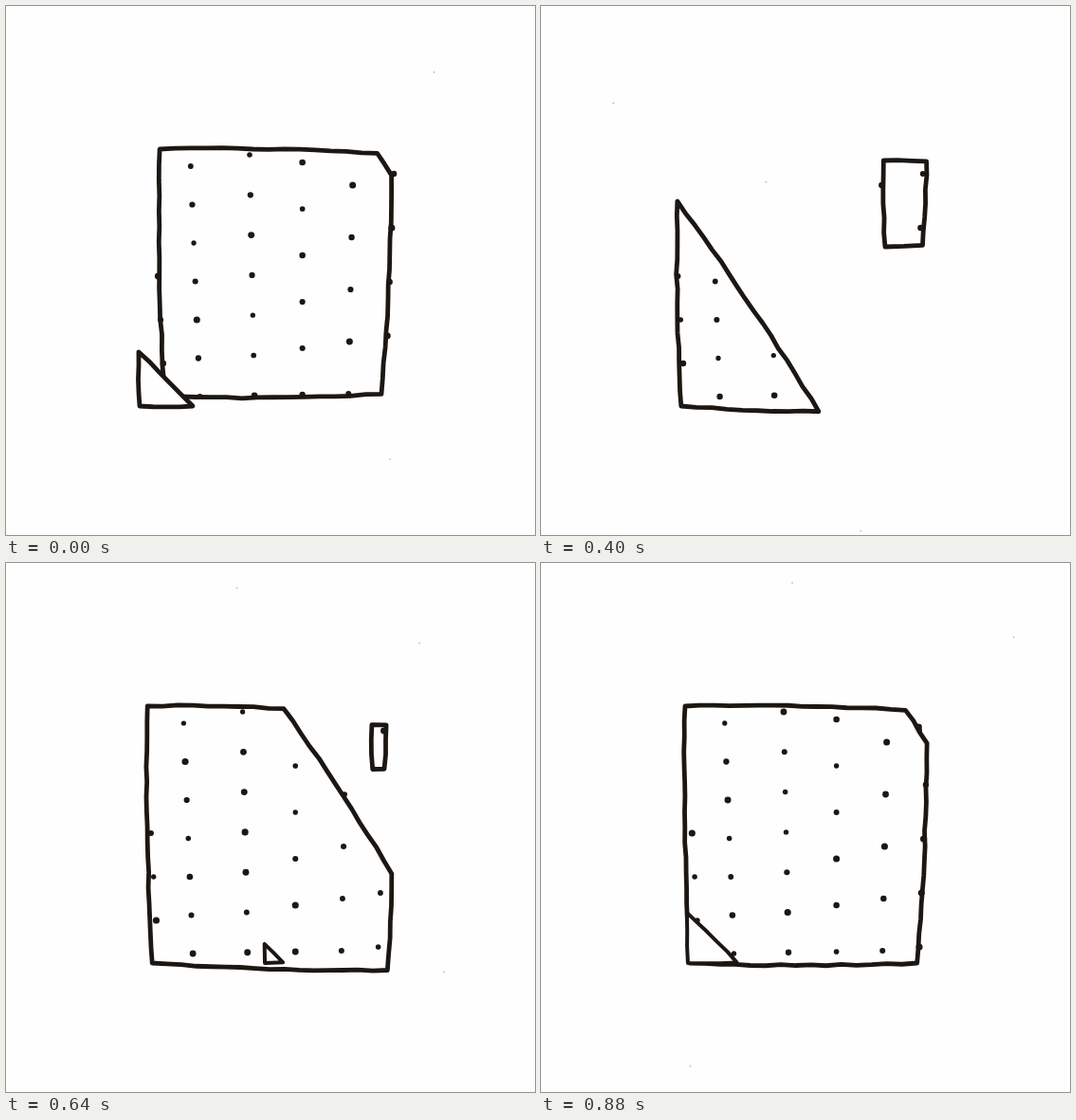
An HTML page with a canvas for the animation above (960 ms loop, 558 by 558 pixels).

```html
<!DOCTYPE html>
<html lang="en">
<head>
<meta charset="utf-8">
<title>Dotted sheet</title>
<style>
  html, body { margin: 0; width: 100%; height: 100%; overflow: hidden; background: #fefefe; }
  canvas { display: block; width: 100%; height: 100%; }
</style>
</head>
<body>
<canvas id="stage" width="558" height="558"></canvas>
<script>
const ctx = document.getElementById('stage').getContext('2d');
const SIZE = 558, INK = '#1c1712', PAPER = '#fefefe';
const STEPS = 12, STEP_MS = 80;
const FIRST_AGE = -5, FLOOR = 422;

const lerp = (a, b, t) => a + (b - a) * t;
const ease = t => (1 - Math.cos(Math.PI * t)) / 2;
const noise = n => { const v = Math.sin(n * 127.1) * 43758.5453; return v - Math.floor(v); };

// Eased value through [age, value] keys, held at both ends
const track = (...keys) => age => {
  const next = keys.findIndex(([at]) => at >= age);
  if (next < 0) return keys[keys.length - 1][1];
  if (next === 0) return keys[0][1];
  const [from, a] = keys[next - 1], [to, b] = keys[next];
  return lerp(a, b, ease((age - from) / (to - from)));
};

// A sheet slides in before age 0, grows until 12, then shrinks away.
const leftAt = track([-5, 287], [0, 141], [11, 157], [12, 167], [13, 197], [15, 301], [17, 363], [19, 385], [23, 397]);
const rightAt = track([7, 403], [12, 396], [14, 406], [20, 399]);
const topAt = track([14, 151], [17, 163], [21, 172]);
const bottomAt = track([11, FLOOR], [12, 412], [13, 379], [15, 289], [17, 254], [23, 181]);
const reachAt = track([-5, 303], [0, 197], [1, 202], [3, 235], [5, 289], [7, 397], [9, 540], [11, 558], [15, 606]);
const dotShiftAt = track([0, -22], [13, 2], [20, -9]);

// Columns of dots: x, first y, spacing
const columns = [[159, 285, 46], [198, 169, 40.5], [258, 157, 42.3], [311, 165, 49], [362, 189, 55], [403, 177, 57]];

// Keeps the part of a polygon where side(point) is positive
function cut(points, side) {
  return points.flatMap((p, i) => {
    const q = points[(i + 1) % points.length];
    const a = side(p), b = side(q), t = a / (a - b);
    const kept = a >= 0 ? [p] : [];
    if (a * b < 0) kept.push([lerp(p[0], q[0], t), lerp(p[1], q[1], t)]);
    return kept;
  });
}

// Tapered sheet, cut by a diagonal that sweeps to the right
function sheetCorners(age) {
  const left = leftAt(age), right = rightAt(age), top = topAt(age), bottom = bottomAt(age);
  const tall = (bottom - top) / 270, wide = (right - left) / 250;
  const drop = 10 * Math.sin(Math.PI * age / 11);
  const slant = 0.65 + 0.35 * Math.exp(-Math.max(age, 0) / 1.8);
  return cut([
    [left - 5 * tall, top],
    [left, bottom],
    [right, bottom + drop * wide],
    [right + 12 * tall, top + 5 * wide]
  ], ([x, y]) => reachAt(age) - (FLOOR - y) * slant - x);
}

// Hand-drawn outline: edges bulge a little and shake
function outline(points, seed) {
  const path = new Path2D();
  points.forEach(([x, y], i) => {
    const [x2, y2] = points[(i + 1) % points.length];
    const dx = x2 - x, dy = y2 - y, length = Math.hypot(dx, dy);
    const parts = Math.max(1, Math.round(length / 16));
    path.lineTo(x, y);
    for (let n = 1; n < parts; n++) {
      const t = n / parts;
      const push = 0.04 * t * (1 - t) + (noise(seed * 31 + i * 17 + n) - 0.5) * 1.4 / length;
      path.lineTo(x + dx * t - dy * push, y + dy * t + dx * push);
    }
  });
  path.closePath();
  return path;
}

function circle(x, y, r) {
  ctx.beginPath();
  ctx.arc(x, y, r, 0, Math.PI * 2);
  ctx.fill();
}

function drawDots(path, age) {
  ctx.lineWidth = 6; // reach of the edge for dots that touch it
  columns.forEach(([x0, first, gap], c) => {
    for (let y = first; y < 414; y += gap) {
      const x = x0 + dotShiftAt(age) + (3 - c) * 0.02 * (y - 290);
      if (ctx.isPointInPath(path, x, y) || ctx.isPointInStroke(path, x, y))
        circle(x, y, 2.6 + noise(age * 7 + c * 13 + y));
    }
  });
}

function drawSheet(age) {
  if (age < FIRST_AGE) return;
  const path = outline(sheetCorners(age), age);
  ctx.fillStyle = PAPER;
  ctx.fill(path);
  ctx.strokeStyle = ctx.fillStyle = INK;
  ctx.lineWidth = age < 0 ? 4 : 4.8;
  ctx.stroke(path);
  if (age > 0) drawDots(path, age);
}

function drawDust(step) {
  ctx.fillStyle = '#aaa';
  for (let n = 0; n < 3; n++) {
    const seed = step * 5 + n + 1;
    circle(noise(seed) * SIZE, noise(seed + 0.3) * SIZE, 0.8);
  }
}

function draw(now) {
  const step = Math.floor(now / STEP_MS) % STEPS;
  ctx.fillStyle = PAPER;
  ctx.fillRect(0, 0, SIZE, SIZE);
  ctx.lineJoin = 'round';
  drawDust(step);
  for (let loop = 1; loop >= -1; loop--) drawSheet(step + loop * STEPS);
}

const start = performance.now();
function tick() {
  draw(performance.now() - start);
  requestAnimationFrame(tick);
}
tick();
</script>
</body>
</html>
```
